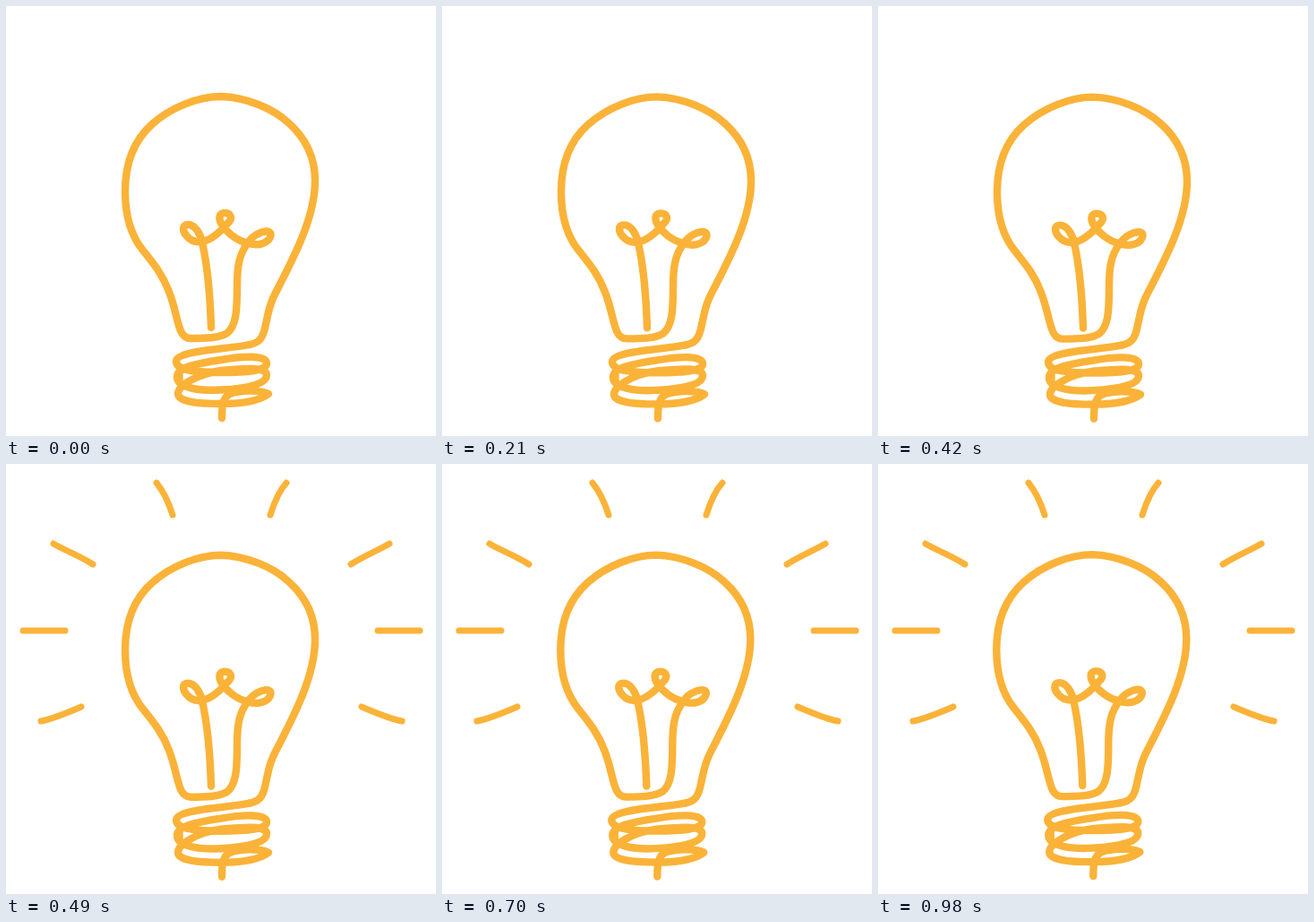
An HTML page that plays this animation: 480 px wide and 480 px high, repeating every 1.05 s.

```html
<!DOCTYPE html>
<html lang="en">
<head>
<meta charset="utf-8">
<title>Light bulb</title>
<style>
html, body { margin: 0; width: 100%; height: 100%; overflow: hidden; background: #fff; }
svg { display: block; width: 100vw; height: 100vh; }
</style>
</head>
<body>
<svg viewBox="0 0 480 480" fill="none" stroke="#fab338" stroke-linecap="round" stroke-linejoin="round">
  <g id="rays" stroke-width="7">
    <path d="M168 21C176 31 182 44 186 57M53 89C67 97 85 104 97 112M19 186H66M39 287C54 284 70 277 84 271"/>
    <path d="M313 21C304 31 299 44 295 57M428 89C414 97 397 104 385 112M415 186H462M397 271C411 277 427 284 442 287"/>
  </g>
  <g id="bulb" stroke-width="8.4">
    <!-- filament -->
    <path d="M229 359C228 328 225 290 219 264C217 254 211 244 203 244C196 244 197 252 202 257C207 263 213 264 219 263C230 261 241 250 247 243C254 237 251 231 244 231C236 231 238 240 241 244C246 252 257 262 270 264.5C282 269 294 264 295.5 256C296 249 286 251.500 280 255C276 257 273 260 270 264.500"/>
    <!-- glass -->
    <path d="M270 264.500C260 277 258 292 258 312C258 340 257 357 247 365C238 371 222 371 206 371C191 371 193 347 182 319C175 300 165 288 153 273C140 257 133 236 133 207C133 172 144 149 163 132C184 113 215 101 240 101C268 102 298 114 316 131C337 150 345 172 345 195C345 237 320 283 301 320C293 335 293 343 290 355C287 372 282 376 272 378"/>
    <!-- screw base -->
    <path d="M272 378C250 383 190 384 190 397C190 407 215 409 240 409C270 409 291 407 291 399C291 389 262 391 240 395C214 399 191 403 191 414C191 426 215 430 240 428.500C270 427 291 422 291 412C291 402 262 405 240 407C212 411 192 424 192 433C192 442 215 444 240 444C268 444 284 440 293 433C282 428 262 429 250 433C242 437 241 446 241 460M193.500 408V420"/>
  </g>
</svg>
<script>
const LOOP = 1050, STEP = 70, RAYS_ON = 490, SHIFT_AT = 630;
const rays = document.getElementById("rays");
const bulb = document.getElementById("bulb");

function draw(now) {
  const t = Math.floor((now % LOOP) / STEP) * STEP;
  rays.setAttribute("visibility", t >= RAYS_ON ? "visible" : "hidden");
  // hand-drawn wobble of less than a pixel
  const dx = t >= SHIFT_AT ? -0.7 : 0;
  const dy = 0.7 * Math.sin(Math.PI * t / LOOP);
  bulb.setAttribute("transform", `translate(${dx} ${dy.toFixed(2)})`);
}

const start = performance.now();
function tick() {
  draw(performance.now() - start);
  requestAnimationFrame(tick);
}
tick();
</script>
</body>
</html>
```
